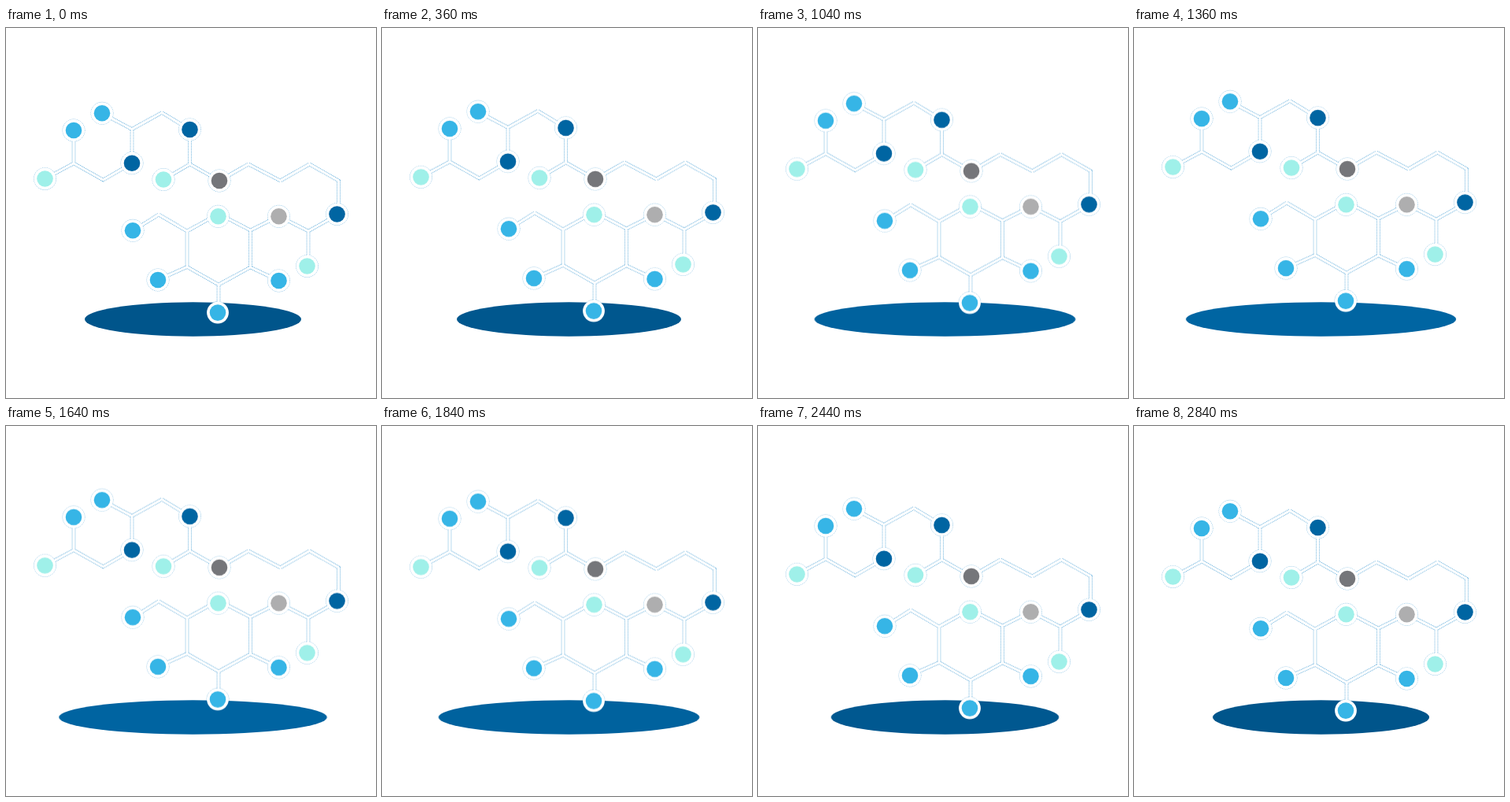
Recreate the animation shown at these times as an HTML page. Size 470 px wide and 470 px high, loop 2880 ms.

```html
<!DOCTYPE html>
<html lang="en">
<head>
<meta charset="utf-8">
<title>Floating molecule</title>
<style>
  html, body { margin: 0; width: 100%; height: 100%; overflow: hidden; background: #fff; }
  svg { display: block; width: 100vw; height: 100vh; }
  .float, .shadow { animation: 1440ms cubic-bezier(.37, 0, .63, 1) infinite alternate; }
  .float { animation-name: rise; }
  .shadow { animation-name: spread; transform-origin: 237.5px 370px; }
  .outline { mix-blend-mode: darken; fill: none; stroke: #64aedb; stroke-dasharray: 1 1; }
  .bonds { fill: none; stroke-linejoin: round; }
  @keyframes rise { to { transform: translateY(-15px); } }
  @keyframes spread {
    from { fill: #00558b; }
    to { fill: #0065a2; transform: scaleX(1.25); }
  }
</style>
</head>
<body>
<svg viewBox="0 0 470 470">
  <defs>
    <path id="bonds" class="bonds" d="M49.5 191.5L86 172V130M86 172L123.5 193L160 172V128.5L122 108.5
      M160 128.5L198 107.5L233.5 129V173L200 192.5M233.5 173L271 194L308 173L348.5 194L385.5 173L422.5 194V236.5
      L384 258V302.5M384 258L346.5 239L310.5 257L270 236L230 258V303.5L270 326L310.5 304V257
      M230 258L194 237L161 257.5M230 303.5L193 320M270 326V361.5M310.5 304L346.5 321"/>
  </defs>
  <ellipse class="shadow" cx="237.5" cy="370" rx="137.5" ry="21.7"/>
  <g class="float outline">
    <use href="#bonds" stroke-width="4.8"/>
    <g id="rings"></g>
  </g>
  <g class="float">
    <use href="#bonds" stroke="#fff" stroke-width="3"/>
    <g id="atoms"></g>
  </g>
</svg>
<script>
  const atoms = {
    '#9ff0e9': [[49.5, 191.5], [200, 192.5], [269.5, 239.3], [382.5, 302.5]],
    '#36b5e6': [[86, 130], [122, 108.3], [161, 257.3], [193, 320], [269, 361.6], [346.5, 321]],
    '#0065a2': [[160, 171.7], [233.5, 129], [420.5, 236.5]],
    '#75767a': [[271, 194]],
    '#aeaeaf': [[346.5, 239.3]]
  };

  function circle(parent, x, y, r, fill) {
    const c = document.createElementNS('http://www.w3.org/2000/svg', 'circle');
    const attrs = { cx: x, cy: y, r, fill };
    for (const name in attrs) c.setAttribute(name, attrs[name]);
    document.getElementById(parent).append(c);
  }

  for (const color in atoms) {
    for (const [x, y] of atoms[color]) {
      circle('rings', x, y, 14, 'none');
      circle('atoms', x, y, 13.9, '#fff');
      circle('atoms', x, y, 10.3, color);
    }
  }
</script>
</body>
</html>
```
